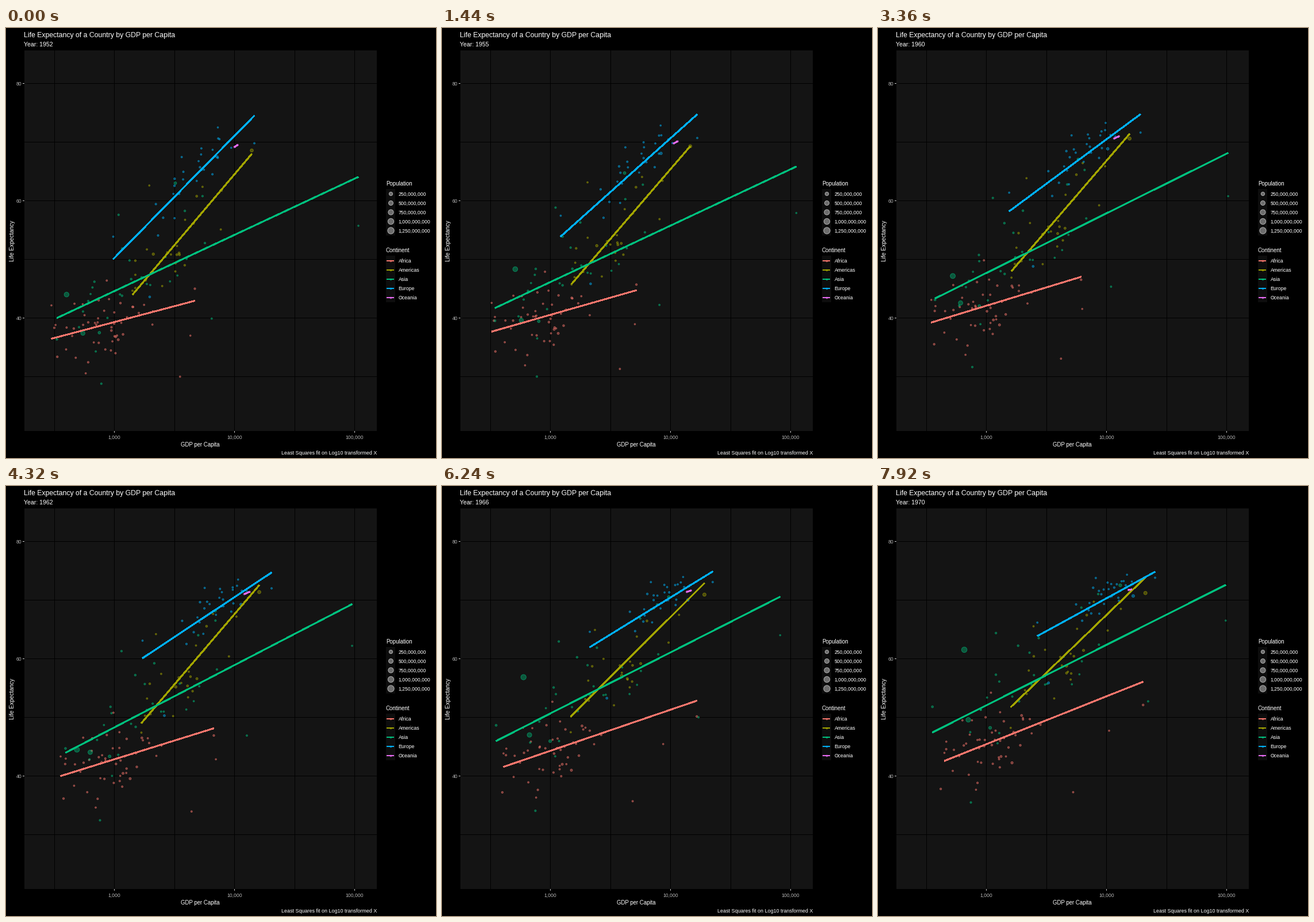
These frames come from a looping animation (748x748 px, 8 s). A matplotlib script:

```python
import numpy as np
import matplotlib.pyplot as plt
from matplotlib.animation import FuncAnimation
from matplotlib.colors import to_rgba
from matplotlib.patches import Rectangle

SIZE, DPI = 748, 100
PT = 72 / DPI          # points per pixel
SPAN = 36              # animation steps for the 20 years 1952-1972
STEP_YEARS = 55 / 99

plt.rcParams["font.family"] = "Liberation Sans"
rng = np.random.default_rng(7)


def to_px(gdp, life):
    return 188.5 + 209 * (np.log10(gdp) - 3), 504.5 - 10.2 * (life - 40)


def blend(keys, p):
    """Piecewise linear value of evenly spaced key rows at p in 0..1."""
    keys = np.asarray(keys, float)
    i = min(int(p * (len(keys) - 1)), len(keys) - 2)
    k = p * (len(keys) - 1) - i
    return keys[i] * (1 - k) + keys[i + 1] * k


class Group:
    """A continent: keyed fit line, countries at its two ends, some with own paths
    (population in millions, then gdp and life pairs) and a crowd that follows the line."""

    def __init__(self, color, fits, ends, paths=(), crowd=0, mean=0, spread=0,
                 scatter=0, drift=0, squeeze=0):
        self.color, self.fits, self.ends, self.paths = color, fits, ends, paths
        self.drift, self.squeeze = drift, squeeze
        x0, _, x1, _ = fits[0]
        self.x = np.clip(rng.normal(mean, spread, crowd), x0 + 5, x1 - 5)
        self.mid = mean
        self.rest = rng.normal(0, scatter, crowd)
        self.wander = rng.normal(0, 8, (2, crowd))
        self.pops = 2 + rng.exponential(6, crowd)

    def points(self, p):
        """Rows of x, y, population."""
        x0, y0, x1, y1 = blend(self.fits, p)
        rows = []
        for (pop, a, b), x, y in zip(self.ends, (x0, x1), (y0, y1)):
            rows.append((x, y + a + (b - a) * p, pop * 1.3 ** p))
        for pop, *path in self.paths:
            keys = [to_px(*pair) for pair in zip(path[::2], path[1::2])]
            rows.append((*blend(keys, p), pop * 1.5 ** p))
        x = self.x + p * (self.drift - self.squeeze * (self.x - self.mid) + self.wander[0])
        y = y0 + (x - x0) * (y1 - y0) / (x1 - x0)
        y = y + self.rest * (1 - self.squeeze * p) + p * self.wander[1]
        return rows + list(zip(x, y, self.pops))


GROUPS = {
    "Africa": Group(
        "#F8766D",
        [(79, 540.5, 328.5, 474.5), (90, 522, 343, 447), (95, 504.5, 361.5, 421.5),
         (108.5, 486.5, 453.5, 367.5), (119, 474, 465, 327)],
        [(1, -58, -10), (14, -21, 46)],
        [(33, 1077, 36.3, 1698, 42.8), (4, 3521, 30, 5473, 37.9),
         (1, 4293, 37, 11402, 48.7), (22, 1419, 41.9, 2024, 51.1)],
        crowd=46, mean=185, spread=52, scatter=38, drift=30),
    "Americas": Group(
        "#A3A500",
        [(220, 464, 427.5, 219), (228, 436, 434, 199), (235.5, 412.5, 440.5, 172.5),
         (222.5, 400, 458.5, 168.5), (235, 377, 468.5, 154.5)],
        [(3, -7, 40), (157, -6, 30)],
        [(57, 2109, 50.9, 4986, 59.5), (30, 3478, 50.8, 6809, 62.4),
         (5, 7690, 55.1, 10505, 65.7), (2, 1953, 62.6, 2523, 65.8)],
        crowd=19, mean=298, spread=38, scatter=42, drift=38),
    "Asia": Group(
        "#00BF7D",
        [(88.5, 504.5, 613, 259), (94, 478.5, 618, 232), (103.5, 464, 602, 205.5),
         (93, 441, 586.5, 191), (95.5, 422.5, 614, 162.5)],
        [(20, 37, -52), (1, 85, 60)],
        [(556, 400, 44, 576, 50.5, 488, 44.5, 613, 58.4, 677, 63.1),
         (372, 547, 37.4, 724, 50.7), (82, 750, 37.5, 1111, 49.2),
         (86, 3217, 63, 14779, 73.4), (8, 779, 28.8, 740, 36.1),
         (4, 6460, 39.9, 24837, 53.9), (8, 1084, 57.6, 1213, 65)],
        crowd=24, mean=215, spread=65, scatter=48, drift=48),
    "Europe": Group(
        "#00B0F6",
        [(186.5, 402, 432, 152.5), (216.5, 343, 450, 149), (237.5, 299.5, 462, 150.5),
         (259.5, 278, 472, 148.5), (286, 252.5, 487, 149.5)],
        [(3, -39, -22), (5, 48, 7)],
        [(22, 1969, 43.6, 3451, 57), (1, 7268, 72.5, 15798, 74.5),
         (69, 7144, 67.5, 18016, 71)],
        crowd=25, mean=342, spread=45, scatter=20, drift=72, squeeze=0.35),
    "Oceania": Group(
        "#E76BF3", [(397.5, 207, 403, 203.5), (414.5, 188, 424, 184), (440, 179.5, 444.5, 179)],
        [(9, 0, 0), (2, 0, 0)]),
}


def area(pop):
    r = 1.15 + 4.6 * np.sqrt(np.asarray(pop, float) / 1300)
    return (2 * r * PT) ** 2


fig = plt.figure(figsize=(SIZE / DPI, SIZE / DPI), dpi=DPI, facecolor="black")
ax = fig.add_axes([0, 0, 1, 1])
ax.set_xlim(0, SIZE)
ax.set_ylim(SIZE, 0)
ax.axis("off")


def rect(x, y, w, h, color, z=0):
    ax.add_patch(Rectangle((x, y), w, h, fc=color, lw=0, antialiased=False, zorder=z))


def label(x, y, s, size, color="white", ha="left", **kw):
    return ax.text(x, y, s, fontsize=size * PT, color=color, ha=ha, va="baseline", **kw)


def dots(x, y, pops, colors):
    return ax.scatter(x, y, s=area(pops), lw=0.9 * PT, zorder=3,
                      facecolors=[to_rgba(c, 0.4) for c in colors],
                      edgecolors=[to_rgba(c, 0.6) for c in colors])


def stroke(x, y, color):
    return ax.plot(x, y, color=color, lw=2 * PT, antialiased=False,
                   solid_capstyle="butt", zorder=4)[0]


# panel, grid and axes
rect(32, 39, 613, 662, "#141414")
for i in range(6):
    x, y = int(84 + 104.5 * i), int(96 + 102 * i)
    rect(x, 39, 1, 662, "black", 1)
    rect(32, y, 613, 1, "black", 1)
    if i % 2:
        rect(x, 701, 1, 3, "#CCCCCC")
        label(x + 0.5, 715, f"{10 ** (3 + i // 2):,}", 8.7, "#B3B3B3", "center")
    elif i < 5 or y < 600:
        rect(29, y, 3, 1, "#CCCCCC")
        label(27.5, y + 4, str(80 - 10 * i), 8.7, "#B3B3B3", "right")

label(31.5, 16, "Life Expectancy of a Country by GDP per Capita", 12.2)
year = label(31.5, 32, "", 10.5)
label(338, 727.5, "GDP per Capita", 9.7, ha="center")
label(14.5, 370, "Life Expectancy", 10.1, ha="center", rotation=90, rotation_mode="anchor")
label(645.5, 742, "Least Squares fit on Log10 transformed X", 8.85, ha="right")

# legends
for top, title in ((274, "Population"), (390, "Continent")):
    label(661, top, title, 9.8)
    rect(661, top + 6, 16, 81, "#0D0D0D")
for i, (name, group) in enumerate(GROUPS.items()):
    pop, y = 250 * (i + 1), 288 + 16.1 * i
    dots([669], [y], [pop], ["white"])
    label(682.5, y + 3.5, f"{pop * 10**6:,}", 8.65)
    y += 116.5
    dots([669], [y], [4], [group.color])
    stroke([662.5, 675.5], [y, y], group.color)
    label(682.5, y + 3.5, name, 8.8)


def cloud(p):
    return np.array([row for g in GROUPS.values() for row in g.points(p)])


tints = [g.color for g in GROUPS.values() for _ in g.points(0)]
people = dots(*cloud(0).T, tints)
trends = {name: stroke([], [], g.color) for name, g in GROUPS.items()}


def draw(frame):
    step = frame // 3
    p = step / SPAN
    now = cloud(p)
    people.set_offsets(now[:, :2])
    people.set_sizes(area(now[:, 2]))
    for name, group in GROUPS.items():
        x0, y0, x1, y1 = blend(group.fits, p)
        trends[name].set_data([x0, x1], [y0, y1])
    year.set_text(f"Year: {round(1952 + step * STEP_YEARS)}")
    return [people, year, *trends.values()]


anim = FuncAnimation(fig, draw, frames=100, interval=80, repeat=True,
                     repeat_delay=0, blit=False)
plt.show()
```
